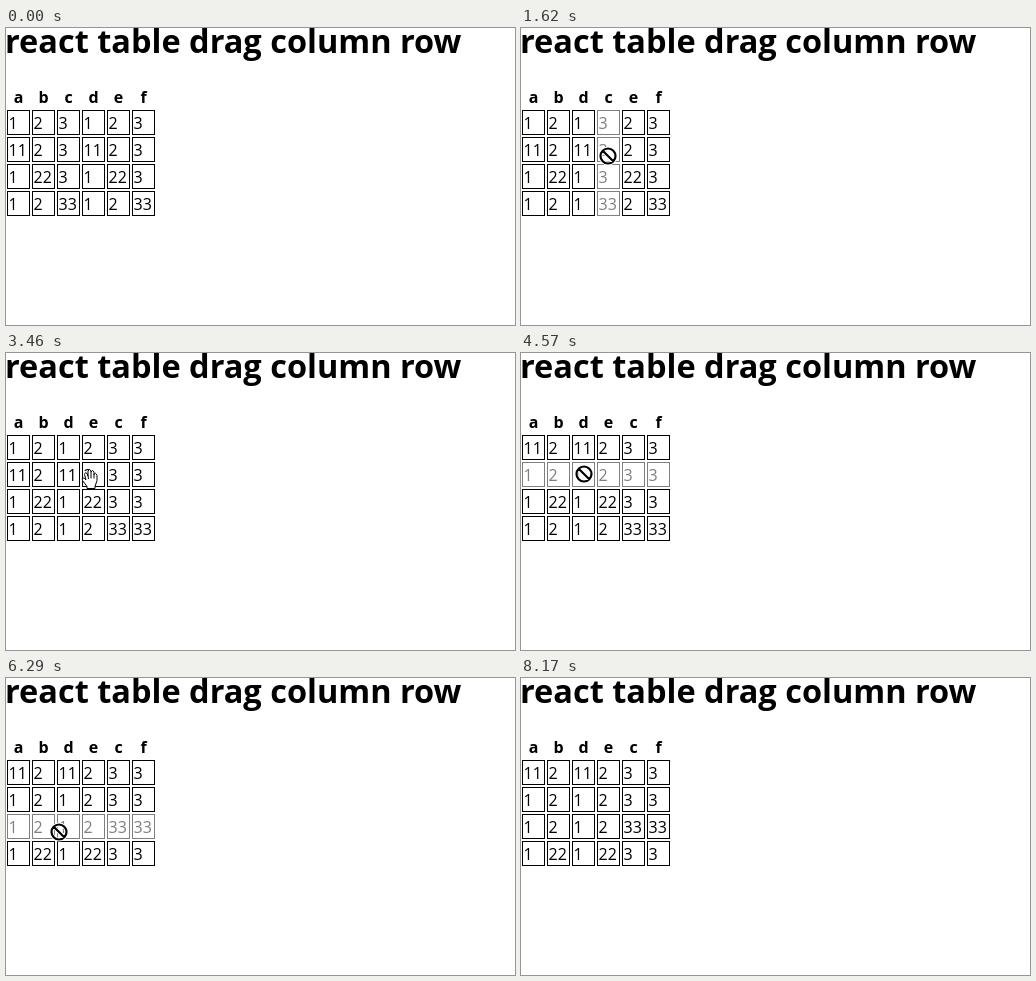
Animation of 509 by 297 pixels, one loop 9.01 s. Source, as an HTML page with a canvas:

```html
<!DOCTYPE html>
<html lang="en">
<head>
<meta charset="utf-8">
<title>react table drag column row</title>
<style>
  html, body { margin: 0; width: 100%; height: 100%; overflow: hidden; background: #fff; }
  canvas { display: block; }
</style>
</head>
<body>
<canvas id="stage" width="509" height="297"></canvas>
<script>
const stage = document.getElementById('stage');
const ctx = stage.getContext('2d');
const LOOP = 9010, STEP = 77;
const FONT = '"Open Sans", "Noto Sans", sans-serif';

const GRID = {
  x: { start: 1, pitch: 25, size: 23, count: 6 },
  y: { start: 82, pitch: 27, size: 25, count: 4 }
};

// The pointer comes in from off the table and glides to each stop: [time, steps, x, y].
const ENTRY = [336, 280];
const GLIDES = [
  [70, 3, 80, 144],
  [390, 6, 68, 169],
  [850, 5, 71, 128],
  [1440, 9, 118, 129],
  [2310, 1, 112, 122],
  [2620, 5, 112, 153],
  [3080, 6, 84, 125],
  [3540, 6, 62, 106],
  [4330, 8, 64, 135],
  [5040, 2, 62, 142],
  [5270, 7, 53, 178],
  [6200, 1, 53, 154],
  [7760, 6, 191, 301]
];

const DRAGS = [
  { from: 1440, to: 2310, axis: 'x' },
  { from: 4330, to: 5040, axis: 'y' },
  { from: 6200, to: 6900, axis: 'y' }
];

const isDragging = (drag, t) => t >= drag.from && t < drag.to;

function pointerAt(t) {
  const i = GLIDES.findLastIndex(glide => glide[0] <= t);
  if (i < 0) return null;
  const [start, steps, x, y] = GLIDES[i];
  const [x0, y0] = i ? GLIDES[i - 1].slice(2) : ENTRY;
  const f = Math.min(1, (1 + Math.floor((t - start + 8) / STEP)) / steps);
  return { x: Math.round(x0 + (x - x0) * f), y: Math.round(y0 + (y - y0) * f) };
}

function slotAt(t, axis) {
  const { start, pitch } = GRID[axis];
  return Math.floor((pointerAt(t)[axis] - start) / pitch);
}

// A dragged column or row is the one under the pointer, and follows it from slot to slot.
function layoutAt(t) {
  const order = { x: [...Array(GRID.x.count).keys()], y: [...Array(GRID.y.count).keys()] };
  const held = {};
  for (const drag of DRAGS.filter(d => d.from <= t)) {
    const { from, to, axis } = drag;
    const [item] = order[axis].splice(slotAt(from - 1, axis), 1);
    order[axis].splice(slotAt(Math.min(t, to - 1), axis), 0, item);
    if (isDragging(drag, t)) held[axis] = item;
  }
  return { order, held };
}

function cellText(column, row) {
  const digit = column % 3 + 1;
  return row === digit ? digit * 11 : digit;
}

function write(text, x, y, font, align = 'left') {
  ctx.font = `${font} ${FONT}`;
  ctx.textAlign = align;
  ctx.fillText(text, x, y);
}

function drawTable(t) {
  const { order, held } = layoutAt(t);
  const { x: gx, y: gy } = GRID;
  order.x.forEach((column, i) => {
    const x = gx.start + gx.pitch * i;
    write('abcdef'[column], x + gx.size / 2, 75, 'bold 16px', 'center');
    order.y.forEach((row, j) => {
      const y = gy.start + gy.pitch * j;
      ctx.globalAlpha = held.x === column || held.y === row ? 0.5 : 1;
      ctx.strokeRect(x + 0.5, y + 0.5, gx.size - 1, gy.size - 1);
      write(cellText(column, row), x + 1.5, y + 19, '16px');
    });
    ctx.globalAlpha = 1;
  });
}

const ARROW = new Path2D('M.5 .5V16.5L4.2 13 6.6 18.3 9 17.2 6.6 12.2H11.8Z');
const HAND = new Path2D('M5.5 19.5V17.5L1 11.5Q0 9.5 1.5 9 3 8.7 4.5 11' +
  'L3 5.5Q4 2 5.8 5L6.5 7V2Q8-1 9.5 2V3Q11 0 12.5 3.2V5.5Q14 2.5 15.5 6.5' +
  'V11.5L13.5 17.5V19.5Z');
const FINGERS = new Path2D('M6.5 6.5L7 10M9.5 3V9.5M12.5 5V9.5');
const BAN = new Path2D();
BAN.arc(0, 0, 7.5, 0, 2 * Math.PI);
BAN.moveTo(-5.3, -5.3);
BAN.lineTo(5.3, 5.3);

function outline(path) {
  ctx.fillStyle = '#fff';
  ctx.fill(path);
  ctx.stroke(path);
}

function drawBan() {
  for (const [color, width] of [['#fff', 4], ['#000', 2.2]]) {
    ctx.strokeStyle = color;
    ctx.lineWidth = width;
    ctx.stroke(BAN);
  }
}

function drawPointer(t) {
  const pos = pointerAt(t);
  if (!pos) return;
  const overTable = ['x', 'y'].every(axis => {
    const slot = slotAt(t, axis);
    return slot >= 0 && slot < GRID[axis].count;
  });
  ctx.save();
  ctx.translate(pos.x, pos.y);
  if (DRAGS.some(drag => isDragging(drag, t))) {
    drawBan();
  } else if (overTable) {
    ctx.translate(-8.5, -9);
    outline(HAND);
    ctx.stroke(FINGERS);
  } else {
    outline(ARROW);
  }
  ctx.restore();
}

function draw(t) {
  ctx.fillStyle = '#fff';
  ctx.fillRect(0, 0, stage.width, stage.height);
  ctx.fillStyle = ctx.strokeStyle = '#000';
  ctx.lineWidth = 1;
  write('react table drag column row', -1, 25, 'bold 32.5px');
  drawTable(t);
  drawPointer(t);
}

const begin = performance.now();
function tick() {
  draw((performance.now() - begin) % LOOP);
  requestAnimationFrame(tick);
}
tick();
</script>
</body>
</html>
```
